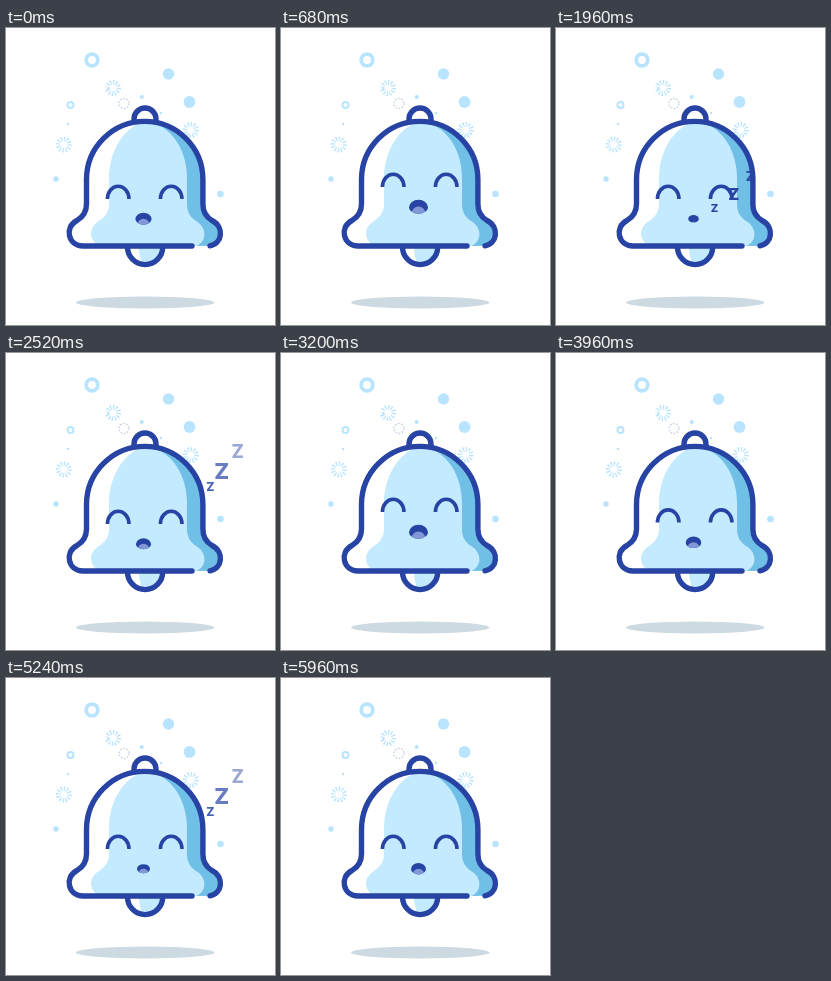
These frames come from a looping animation (269 by 297 pixels, 6000 ms). An HTML page:

```html
<!DOCTYPE html>
<html lang="en">
<head>
<meta charset="utf-8">
<title>Sleepy bell</title>
<style>
  html, body { margin: 0; width: 100%; height: 100%; overflow: hidden; background: #fff; }
  svg { display: block; width: 100vw; height: 100vh; }
  text { font: 800 10px Inter, "Liberation Sans", sans-serif; text-anchor: middle; fill: #2743a3; }
  .line { fill: none; stroke: #2743a3; stroke-width: 5.4; stroke-linecap: round; }
  .sky { fill: #c3eaff; }
  .ring { fill: none; stroke: #b8e4ff; }
  .burst { fill: none; stroke: #b8e4ff; stroke-width: 4.6; stroke-dasharray: .85 1.15; }
</style>
</head>
<body>
<svg viewBox="0 0 269 297">
  <defs>
    <path id="bell" d="M186 218H77C62 218 58 199 71 192.5C77 189 80.5 184 80.5 176V151.5A58.2 58.2 0 0 1 196.9 151.5V176C196.9 184 200 189 206 192.5C219 199 216 216 204 217.8"/>
    <path id="clapper" d="M121.5 219A17.6 17.6 0 0 0 156.7 219"/>
    <clipPath id="inBell"><use href="#bell"/></clipPath>
    <clipPath id="inClapper"><use href="#clapper"/></clipPath>
    <clipPath id="inMouth"><path id="mouthClip"/></clipPath>
  </defs>

  <ellipse cx="139.2" cy="274.5" rx="69.3" ry="6" fill="#cedae2"/>

  <g fill="#b8e4ff">
    <circle cx="162.5" cy="46" r="5.7"/>
    <circle cx="183.5" cy="74" r="5.9"/>
    <circle cx="135.7" cy="69" r="2.1"/>
    <circle cx="155" cy="85" r="1.2"/>
    <circle cx="62" cy="96" r="1.2"/>
    <circle cx="50" cy="151" r="2.7"/>
    <circle cx="214.5" cy="166" r="3.3"/>
  </g>
  <circle class="ring" cx="86" cy="32" r="5.8" stroke-width="3.8"/>
  <circle class="ring" cx="64.5" cy="77" r="3" stroke-width="2"/>
  <circle class="ring" cx="118" cy="75.5" r="5" stroke-width="1.3" stroke-dasharray="1.6 1.54" style="stroke:#c5d0e0"/>
  <circle class="burst" cx="107" cy="60" r="5.7" pathLength="24"/>
  <circle class="burst" cx="57.8" cy="116.5" r="5.7" pathLength="24"/>
  <circle class="burst" cx="184.7" cy="102" r="5.7" pathLength="24"/>

  <path class="line" style="fill:#fff" d="M128 92V91A11 11 0 0 1 150 91V92"/>
  <use href="#clapper" fill="#fff"/>
  <path class="sky" clip-path="url(#inClapper)" d="M133 218H160V242H140Q133 232 133 218Z"/>
  <use href="#clapper" class="line"/>

  <use href="#bell" fill="#fff"/>
  <g clip-path="url(#inBell)">
    <path class="sky" d="M141 92C117 99 103 124 103 150V176C103 184 99 189 93 193C81 200 83 215 96 219H220V92Z"/>
    <path fill="#70bfe6" d="M140 92C168 99 181 124 181 150V176C181 184 184 189 190 193C202 200 201 215 188 219H220V92Z"/>
  </g>
  <use href="#bell" class="line"/>

  <g id="face">
    <path fill="none" stroke="#2743a3" stroke-width="3.6" d="M101.4 171A10.8 12.7 0 0 1 123 171M154.4 171A10.8 12.7 0 0 1 176 171"/>
    <path id="mouth" fill="#2743a3"/>
    <ellipse id="tongue" clip-path="url(#inMouth)" cx="137.5" fill="#8298d6"/>
  </g>
  <g id="snore"></g>
</svg>
<script>
const LOOP = 6000, BREATH = 2720, FLIGHT = 1280;
const $ = id => document.getElementById(id);
const clamp = v => Math.max(0, Math.min(1, v));
const ease = v => (1 - Math.cos(Math.PI * clamp(v))) / 2;

// time, mouth width, mouth height
const mouthKeys = [
  [0, 16, 12], [480, 19, 14], [680, 19, 14], [1320, 15, 11], [1880, 10, 7],
  [2520, 15, 11], [2720, 16, 12], [3200, 19, 14], [3400, 19, 14],
  [4040, 15, 11], [4600, 10, 7], [5240, 13, 9], [6000, 15, 11.5]
];

// start time within a breath, font size at take-off, growth over the flight
const letters = [[1408, 9, 10.6], [1625, 13, 12.8], [1808, 10.7, 2.5]].map(([start, size, grow]) => {
  const el = document.createElementNS("http://www.w3.org/2000/svg", "text");
  el.textContent = "Z";
  $("snore").append(el);
  return { el, start, size, grow };
});

const bezier = (t, a, b, c, d) => {
  const s = 1 - t;
  return s * s * s * a + 3 * s * s * t * b + 3 * s * t * t * c + t * t * t * d;
};

function mouthSize(time) {
  const i = mouthKeys.findIndex(k => k[0] > time);
  const a = mouthKeys[i - 1], b = mouthKeys[i];
  const p = (time - a[0]) / (b[0] - a[0]);
  return [1, 2].map(n => a[n] + (b[n] - a[n]) * p);
}

function drawFace(time) {
  const breath = time % BREATH;
  const lift = time < 2 * BREATH ? ease((breath - 20) / 440) - ease((breath - 700) / 700) : 0;
  $("face").setAttribute("transform", `translate(0 ${-12 * lift})`);
  const [w, h] = mouthSize(time);
  const r = w / 2, top = h * 0.54, low = h - top, y = 190.7 + h * 0.04;
  const d = `M${137.5 - r} ${y}A${r} ${top} 0 0 1 ${137.5 + r} ${y}A${r} ${low} 0 0 1 ${137.5 - r} ${y}Z`;
  $("mouth").setAttribute("d", d);
  $("mouthClip").setAttribute("d", d);
  const tongue = $("tongue");
  tongue.setAttribute("cy", y + low);
  tongue.setAttribute("rx", r * 0.75);
  tongue.setAttribute("ry", low * 1.1 * clamp((w - 10) / 3));
}

function drawLetter({ el, start, size, grow }, breath) {
  const t = (breath - start) / FLIGHT;
  const visible = t > 0 && t < 1;
  el.style.display = visible ? "" : "none";
  if (!visible) return;
  const scale = (size + grow * t) / 10 * clamp(t / 0.07);
  const x = bezier(t, 137, 205, 200, 248);
  const y = bezier(t, 191, 162, 121, 83);
  el.setAttribute("transform", `translate(${x} ${y}) scale(${scale}) translate(0 3.64)`);
  el.style.opacity = Math.min(1, Math.sqrt(1.6 * (1 - t)));
}

function frame() {
  const time = performance.now() % LOOP;
  drawFace(time);
  for (const letter of letters) {
    // the last letters of the first breath outlive it
    const first = time < letter.start + FLIGHT;
    drawLetter(letter, first ? time : time - BREATH);
  }
  requestAnimationFrame(frame);
}
frame();
</script>
</body>
</html>
```
